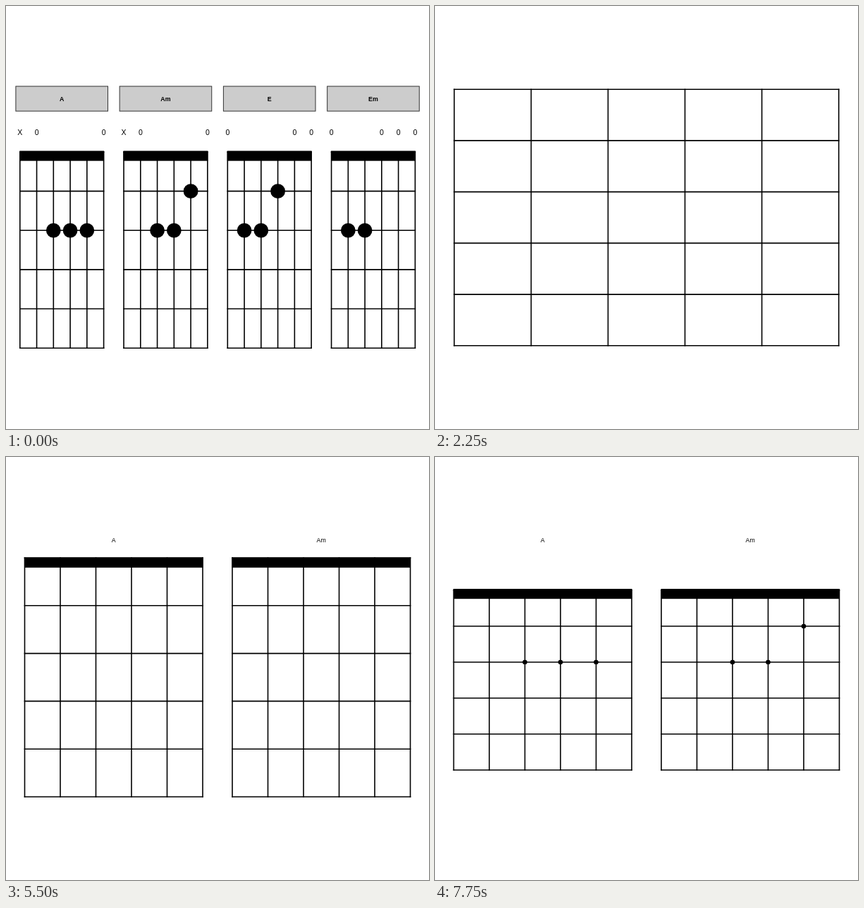
Write an HTML page that moves like this. It is 600 by 600 pixels and loops after 8000 ms.

```html
<!DOCTYPE html>
<html lang="en">
<head>
<meta charset="utf-8">
<title>Chord charts</title>
<style>
  html, body { margin: 0; width: 100%; height: 100%; overflow: hidden; background: #fff; }
  svg { display: block; width: 100%; height: 100%; }
  text { font-family: "Liberation Sans", Arial, sans-serif; text-anchor: middle; }
</style>
</head>
<body>
<svg id="stage" viewBox="0 0 600 600"></svg>
<script>
const LOOP = 8000;
const stage = document.getElementById('stage');

const path = (d, width, color = '#000') =>
  `<path d="${d}" fill="none" stroke="${color}" stroke-width="${width}" stroke-linecap="square"/>`;
const rect = (x, y, w, h, fill, extra = '') =>
  `<rect x="${x}" y="${y}" width="${w}" height="${h}" fill="${fill}" ${extra}/>`;
const text = (x, y, size, label, extra = '') =>
  `<text x="${x}" y="${y}" font-size="${size}" ${extra}>${label}</text>`;

// A board has strings 0..5 from the left and frets 0..5 from the top.
const board = (left, right, top, bottom) => ({
  left, right, top, bottom,
  x: s => left + (right - left) * s / 5,
  y: f => top + (bottom - top) * f / 5
});
const six = [0, 1, 2, 3, 4, 5];

const strings = b => path(six.map(s => `M${b.x(s)} ${b.top}V${b.bottom}`).join(''), 1.6);
const frets = b => path(six.map(f => `M${b.left} ${b.y(f)}H${b.right}`).join(''), 1.6);
const grid = b => strings(b) + frets(b);
const nut = (b, fret = 0.1, h = 14.2) =>
  rect(b.left - 0.5, b.y(fret) - h / 2, b.right - b.left + 1, h, '#000');
const dots = (b, spots, r) =>
  spots.map(([s, f]) => `<circle cx="${b.x(s)}" cy="${b.y(f)}" r="${r}"/>`).join('');

const chords = [
  { name: 'A', marks: 'X0   0', fingers: [[2, 2], [3, 2], [4, 2]] },
  { name: 'Am', marks: 'X0   0', fingers: [[2, 2], [3, 2], [4, 1]] },
  { name: 'E', marks: '0   00', fingers: [[1, 2], [2, 2], [3, 1]] },
  { name: 'Em', marks: '0  000', fingers: [[1, 2], [2, 2]] }
];

function chart(chord, i) {
  const dx = i * 147.25;
  const b = board(19.8 + dx, 138.6 + dx, 207, 485.2);
  const marks = [...chord.marks].map((m, s) =>
    m === ' ' ? '' : text(b.x(s), 183.3, 10.5, m)).join('');
  return rect(13.9 + dx, 113.9, 130.6, 35.2, '#ccc', 'stroke="#333" stroke-width="1"') +
    text(79.2 + dx, 134.6, 8.8, chord.name, 'font-weight="bold"') +
    marks + grid(b) + nut(b) + dots(b, chord.fingers, 10.4);
}

const plotBoard = board(50.5, 566.5, 124.2, 457.2);

function plot(content) {
  const b = plotBoard;
  const rules = (from, width) => path([0, 2, 4].map(k =>
    `M${b.x(k + from)} 108V473.5M25.5 ${b.y(5 - k - from)}H591.5`).join(''), width, '#fff');
  const ticks = [1, 3, 5].map(k => {
    const x = b.x(k), y = b.y(5 - k);
    return path(`M${x} 475V477M22 ${y}H24`, 1.5, '#333') +
      text(x, 483.5, 4.5, k + 1, 'fill="#4d4d4d"') +
      text(17, y + 1.6, 4.5, k + 1, 'fill="#4d4d4d"');
  }).join('');
  return rect(24.8, 107.5, 567.5, 366.5, '#ebebeb') + rules(0, 0.75) + rules(1, 1.5) + ticks +
    text(308.5, 491.5, 5.6, 'x') +
    text(0, 0, 5.6, 'y', 'transform="translate(11 291) rotate(-90)"') + content;
}

const wide = board(27.3, 572.7, 118.2, 481.8);
const low = board(27.3, 572.7, 173.7, 481.8);
const mid = board(27.3, 572.7, 151.2, 481.8);
const single = (b, fret, h) => grid(b) + nut(b, fret, h);
const open = [0, 1, 5].map(s => [s, -0.5]);

// Two boards side by side, the chord name above each.
const pair = (top, bottom, spots) => chords.slice(0, 2).map((chord, i) => {
  const dx = i * 294.5;
  const b = board(26.5 + dx, 279 + dx, top, bottom);
  return text(152.7 + dx, 121, 8.8, chord.name) + grid(b) + nut(b) + dots(b, spots(chord), 3.3);
}).join('');
const none = () => [];
const fingers = chord => chord.fingers;

const scenes = [
  [0, chords.map(chart).join('')],
  [1000, ''],
  [1250, plot('')],
  [1500, plot(strings(plotBoard))],
  [1750, plot(grid(plotBoard))],
  [2000, plot(single(plotBoard, 0, 12))],
  [2250, grid(wide)],
  [2500, single(wide, 0, 12)],
  [2750, single(wide, 0.1, 12)],
  [3000, single(wide, 0.2, 12)],
  [3250, single(wide, 0.15, 12)],
  [3500, single(wide, 0.1, 12)],
  [4000, single(wide)],
  [4750, single(low, -0.9)],
  [5000, single(wide)],
  [5250, single(mid) + dots(mid, open, 3.3)],
  [5500, pair(143, 482, none)],
  [5750, pair(168.3, 469.5, none)],
  [6000, pair(168.3, 469.5, () => open)],
  [6500, pair(189, 444, none)],
  [6750, pair(189, 444, fingers)]
];

let shown = -1;
function draw(time) {
  const t = time % LOOP;
  const i = scenes.findLastIndex(([start]) => start <= t);
  if (i !== shown) {
    stage.innerHTML = scenes[i][1];
    shown = i;
  }
}

const begin = performance.now();
function tick() {
  draw(performance.now() - begin);
  requestAnimationFrame(tick);
}
tick();
</script>
</body>
</html>
```
